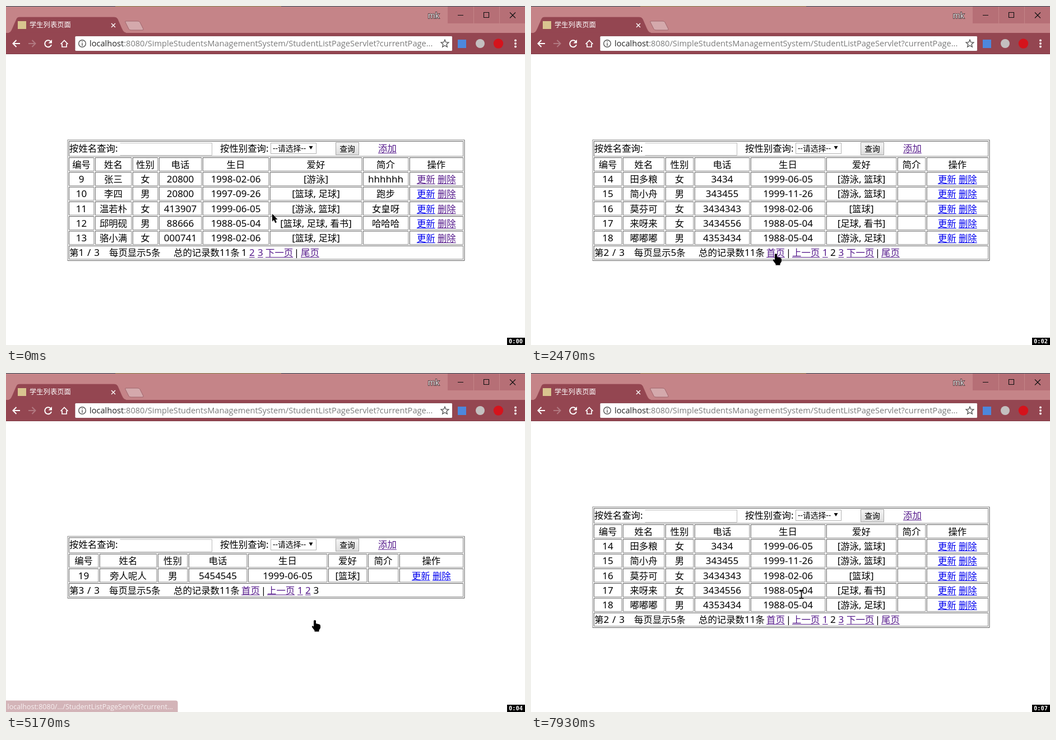
Animation of 926 by 605 pixels, one loop 8000 ms. Source, as an HTML page:

```html
<!DOCTYPE html>
<html lang="zh-CN">
<head>
<meta charset="utf-8">
<title>学生列表页面</title>
<style>
html, body { margin: 0; width: 100%; height: 100%; overflow: hidden; background: #fff; }
svg { display: block; width: 926px; height: 605px; }
text { font-family: "Noto Sans", "Noto Sans CJK SC", "Noto Sans CJK", sans-serif; white-space: pre; }
.page text { font-size: 16.4px; }
.page .latin { font-size: 17px; }
.page .control { font-size: 13.8px; }
.ui { font-family: "Open Sans", "Noto Sans", sans-serif; }
.mid { text-anchor: middle; }
.spaced { word-spacing: 1.5px; }
.line { fill: none; stroke-width: .9; }
.icon { fill: none; stroke: #fff; stroke-width: 2; }
.active { fill: #f00; }
</style>
</head>
<body>
<svg id="stage" viewBox="0 0 926 605">
  <defs>
    <linearGradient id="buttonFace" x2="0" y2="1">
      <stop stop-color="#f5f5f5"/><stop offset="1" stop-color="#dcdcdc"/>
    </linearGradient>
  </defs>
  <rect width="926" height="605" fill="#fff"/>

  <!-- window frame and tabs -->
  <rect width="926" height="48" fill="#c58488"/>
  <rect width="926" height="1" fill="#35505c"/>
  <rect x="195" width="296" height="1" fill="#8a8450"/>
  <path d="M788 1H834V31H788ZM835 1H880V31H835ZM881 1H926V31H881Z" fill="#b66f76"/>
  <path d="M806 16.5H816M852.5 11.5H861.5V20.5H852.5ZM899 11.5L909 21.5M909 11.5L899 21.5" fill="none" stroke="#111" stroke-width="1.1"/>
  <text class="ui mid" x="763" y="22" font-size="14" fill="#eee" stroke="#5c4447" stroke-width="2" paint-order="stroke">mk</text>
  <path d="M5 48C10 46 10 43 19 23Q20 20 24 20H193Q197 20 199 23C208 43 208 46 214 48Z" fill="#944651" stroke="#944651" stroke-width=".6"/>
  <path d="M214 27H235Q238 27 239 29L245 41Q246 43 243 43H223Q220 43 219 41L213 29Q212 27 214 27Z" fill="#d4a9ac" stroke="#a0666c"/>
  <rect id="favicon" x="21" y="27" width="15" height="14" fill="#d9c48f"/>
  <circle id="spinner" class="icon" cx="28" cy="34" r="6" stroke-dasharray="27 11"/>
  <text x="42" y="38" font-size="12.3" fill="#fff">学生列表页面</text>
  <path class="icon" d="M188 31L195 38M195 31L188 38" style="stroke-width:1.4"/>

  <!-- toolbar -->
  <rect y="48" width="926" height="38" fill="#944651"/>
  <rect y="85" width="926" height="1" fill="#7e3944"/>
  <path class="icon" d="M25 67H13M18.5 61L12.5 67L18.5 73"/>
  <path class="icon" d="M40 67H52M46.5 61L52.5 67L46.5 73" opacity=".28"/>
  <path class="icon" d="M79.5 63A6 6 0 1 0 81 69"/>
  <path d="M82 60V66.5H75.5Z" fill="#fff"/>
  <path class="icon" d="M97.5 68L104 61.5L110.5 68M100 67V73H108V67" style="stroke-width:1.7"/>
  <rect x="123" y="53.5" width="673.5" height="27" rx="2" fill="#fff" stroke="#7e3944" stroke-width=".8"/>
  <g fill="none" stroke="#555" stroke-width="1.4">
    <circle cx="136" cy="67" r="6.3"/>
    <path d="M136 66V71M136 63V64.6"/>
    <path d="M783 60.2L784.9 64.7L789.8 65.1L786.1 68.3L787.2 73.1L783 70.5L778.8 73.1L779.9 68.3L776.2 65.1L781.1 64.7Z"/>
  </g>
  <text class="ui" x="149" y="72" font-size="14.6" fill="#7b7b7b"><tspan fill="#222">localhost</tspan>:8080/SimpleStudentsManagementSystem/StudentListPageServlet?currentPage...</text>
  <rect x="806" y="60" width="15" height="15" fill="#4d87dc"/>
  <circle cx="846" cy="67" r="8" fill="#c4c0c0"/>
  <circle cx="878.5" cy="67" r="8.7" fill="#d5131c"/>
  <g fill="#fff"><circle cx="909" cy="61.5" r="1.9"/><circle cx="909" cy="67" r="1.9"/><circle cx="909" cy="72.5" r="1.9"/></g>

  <g id="pages"></g>

  <g id="status">
    <path d="M0 584.5H302.5Q306.5 584.5 306.5 588.5V605H0Z" fill="#944651"/>
    <text class="ui" x="2.5" y="600" font-size="12.5" fill="#ecd9db">localhost:8080/.../StudentListPageServlet?current...</text>
  </g>
  <g id="cursor">
    <path id="arrow" d="M0 0V13.5L3 10.8L5.4 16.2L7.9 15.1L5.6 10H9.6Z"/>
    <path id="hand" d="M-2 1.5Q-2 0 0 0Q2 0 2 1.5V6L8 7.5Q10 8.2 10 10.5V14L7.5 18V20.5H-.5V18.5L-4.6 13Q-6 11 -4 10.3L-2 11.5Z"/>
    <path id="beam" d="M-4 -7.2H-1.2L0 -6L1.2 -7.2H4M0 -6V6M-4 7.2H-1.2L0 6L1.2 7.2H4" fill="none" stroke="#000" stroke-width="1.8"/>
  </g>
  <rect x="894" y="592" width="32" height="13" fill="#000"/>
  <text id="clock" x="897" y="602" fill="#fff" font-size="10.4" font-weight="bold" style="font-family:'DejaVu Sans Mono',monospace">0:00</text>
</svg>
<script>
const VISITED = '#551a8b', FRESH = '#0000ee', GRAY = '#808080', DARK = '#444';
const LOOP = 8000;
const ROW = 26.24, GAP = 2.46;
const LEFT = 109.9, RIGHT = 818, TOP = 238.9, HEAD = 269.4;
const $ = id => document.getElementById(id);

const heads = ['编号', '姓名', '性别', '电话', '生日', '爱好', '简介', '操作'];
const pages = [
  { dividers: [158, 225, 272, 350, 470, 636, 719], hot: '2',
    rows: ['9|张三|女|20800|1998-02-06|[游泳]|hhhhhh', '10|李四|男|20800|1997-09-26|[篮球, 足球]|跑步',
      '11|温若朴|女|413907|1999-06-05|[游泳, 篮球]|女皇呀', '12|邱明砚|男|88666|1988-05-04|[篮球, 足球, 看书]|哈哈哈',
      '13|骆小满|女|000741|1998-02-06|[篮球, 足球]|'],
    pager: [[420, '1'], [434, '2'], [449, '3'], [463, '下一页'], [518.5, '|'], [526, '尾页']] },
  { dividers: [163, 239, 291, 391, 526, 653, 705], hot: '3',
    rows: ['14|田多粮|女|3434|1999-06-05|[游泳, 篮球]|', '15|简小舟|男|343455|1999-11-26|[游泳, 篮球]|',
      '16|莫芬可|女|3434343|1998-02-06|[篮球]|', '17|来呀来|女|3434556|1988-05-04|[足球, 看书]|',
      '18|嘟嘟嘟|男|4353434|1988-05-04|[游泳, 足球]|'],
    pager: [[420, '首页'], [459.5, '|'], [466, '上一页'], [520, '1'], [534, '2'], [548.5, '3'], [563, '下一页'], [618.5, '|'], [625, '尾页']] },
  { dividers: [166, 270, 325, 431, 574, 645, 701], hot: '上一页', shift: 2 * ROW,
    rows: ['19|旁人呢人|男|5454545|1999-06-05|[篮球]|'],
    pager: [[420, '首页'], [459.5, '|'], [466, '上一页'], [520, '1'], [534, '2'], [548.5, '3']] }
];

const latin = s => s.replace(/[^\u4e00-\u9fff]+/g, m => `<tspan class="latin">${m}</tspan>`);
const text = (x, y, s, cls = '') => `<text class="${cls}" x="${x}" y="${y}">${latin(s)}</text>`;

function link(x, y, s, color, hot) {
  const width = /\d/.test(s) ? 9.7 : s.length * 16.4;
  return `<g class="${hot ? 'hot' : ''}" fill="${color}">${text(x, y, s)}
    <rect x="${x}" y="${Math.round(y) + 2}" width="${width}" height="1"/></g>`;
}

const bevel = (x1, y1, x2, y2, topLeft, bottomRight) =>
  `<path class="line" stroke="${topLeft}" d="M${x1} ${y2}V${y1}H${x2}"/>
  <path class="line" stroke="${bottomRight}" d="M${x2} ${y1}V${y2}H${x1}"/>`;

// Takes the middle lines of the gaps around the cell.
const cell = (x1, y1, x2, y2) =>
  bevel(x1 + GAP / 2, y1 + GAP / 2, x2 - GAP / 2, y2 - GAP / 2, DARK, GRAY);

const [innerLeft, innerRight, innerTop] = [LEFT + GAP / 2, RIGHT - GAP / 2, TOP + GAP / 2];

const searchForm = cell(innerLeft, innerTop, innerRight, HEAD) +
  text(113, 260, '按姓名查询:') +
  '<path class="line" stroke="#b4b4b4" d="M203.5 244.5H367.5V266.5H203.5"/>' +
  text(382, 260, '按性别查询:') + bevel(472.5, 244.5, 553.5, 263.5, '#a9a9a9', '#a9a9a9') +
  `<text class="control" x="476" y="259">--请选择--</text>
  <path d="M540.5 250H547.5L544 256Z"/>
  <rect x="588.5" y="243.5" width="41" height="22" fill="url(#buttonFace)" stroke="#a6a6a6"/>
  <text class="control mid" x="609" y="260">查询</text>` +
  link(664, 260, '添加', VISITED);

function drawPage({ dividers, rows, pager, hot, shift = 0 }, index) {
  const edges = [innerLeft, ...dividers, innerRight];
  const footer = HEAD + ROW * (rows.length + 1), bottom = footer + ROW;
  let out = bevel(LEFT, TOP, RIGHT, bottom + GAP / 2, GRAY, DARK) + searchForm;
  [heads, ...rows.map(r => r.split('|'))].forEach((values, r) => {
    const top = HEAD + ROW * r, base = 289 + ROW * r;
    heads.forEach((_, c) => {
      const left = edges[c], right = edges[c + 1], center = (left + right) / 2;
      out += cell(left, top, right, top + ROW);
      if (values[c]) out += text(center, base, values[c], 'mid');
      else if (c === 7) {
        out += link(center - 35, base, '更新', index === 0 && r === 1 ? VISITED : FRESH) +
          link(center + 2, base, '删除', index === 0 ? VISITED : FRESH);
      }
    });
  });
  const base = footer + 19.4;
  out += cell(innerLeft, footer, innerRight, bottom) + text(113, base, `第${index + 1} / 3`, 'spaced') +
    text(184, base, '每页显示5条') + text(299, base, '总的记录数11条');
  for (const [x, s] of pager) {
    if (s === '|') out += text(x, base, s, 'mid');
    else if (s === String(index + 1)) out += text(x, base, s);
    else out += link(x, base, s, VISITED, s === hot);
  }
  return `<g class="page" transform="translate(0 ${shift})">${out}</g>`;
}

$('pages').innerHTML = pages.map(drawPage).join('');
const pageNodes = [...document.querySelectorAll('.page')];
const hotLinks = [...document.querySelectorAll('.hot')];

const cursorTrack = [
  [0, 'arrow', 475, 371], [130, 'arrow', 462, 382], [250, 'arrow', 447, 391], [400, 'arrow', 456, 414],
  [520, 'arrow', 474, 449], [680, 'arrow', 478, 451], [820, 'arrow', 452, 447], [940, 'beam', 440, 445],
  [1060, 'hand', 437, 442], [2590, 'hand', 450, 443], [2740, 'hand', 490, 442], [2870, 'beam', 536, 443],
  [3010, 'beam', 544, 442], [3110, 'beam', 551, 442], [3260, 'hand', 551, 441], [5950, 'arrow', 526, 421],
  [6100, 'arrow', 511, 411], [6210, 'arrow', 498, 407], [6320, 'arrow', 488, 405], [6470, 'arrow', 478, 404],
  [6590, 'arrow', 466, 400], [6710, 'arrow', 455, 398], [6830, 'arrow', 474, 397], [6980, 'hand', 481, 395],
  [7650, 'beam', 482.5, 395]
];
const statusTrack = [
  [0, 0], [820, .3], [940, .68], [1060, .85], [1160, 1], [2230, .65], [2350, .3], [2470, 0],
  [2740, .35], [2870, .7], [3260, .85], [3380, 1], [5170, .4], [5280, .15], [5390, 0],
  [6980, .68], [7130, 1], [7650, .65], [7780, .3], [7930, 0]
];
const pageTrack = [[0, 0], [1960, 1], [5020, 2], [7500, 1]];
const loading = [[1860, 2080], [4900, 5020], [7500, 7650]];
const presses = [[1590, 1710], [4750, 5020], [7240, 7500]];
const ticks = [1060, 1960, 3010, 4060, 5280, 6210, 7240];

const at = (track, t) => track.findLast(key => key[0] <= t);
const within = ([from, to], t) => t >= from && t < to;
const show = (node, on) => { node.style.display = on ? '' : 'none'; };

function render() {
  const t = performance.now() % LOOP;
  const [, kind, x, y] = at(cursorTrack, t);
  $('cursor').setAttribute('transform', `translate(${x} ${y})`);
  for (const name of ['arrow', 'hand', 'beam']) show($(name), name === kind);

  const page = at(pageTrack, t)[1];
  pageNodes.forEach((node, i) => show(node, i === page));
  hotLinks.forEach((node, i) => node.classList.toggle('active', within(presses[i], t)));

  const busy = loading.some(span => within(span, t));
  show($('spinner'), busy);
  show($('favicon'), !busy);
  $('spinner').setAttribute('transform', `rotate(${t * .36} 28 34)`);
  $('status').style.opacity = at(statusTrack, t)[1];
  $('clock').textContent = '0:0' + ticks.filter(tick => tick <= t).length;
  requestAnimationFrame(render);
}
render();
</script>
</body>
</html>
```
